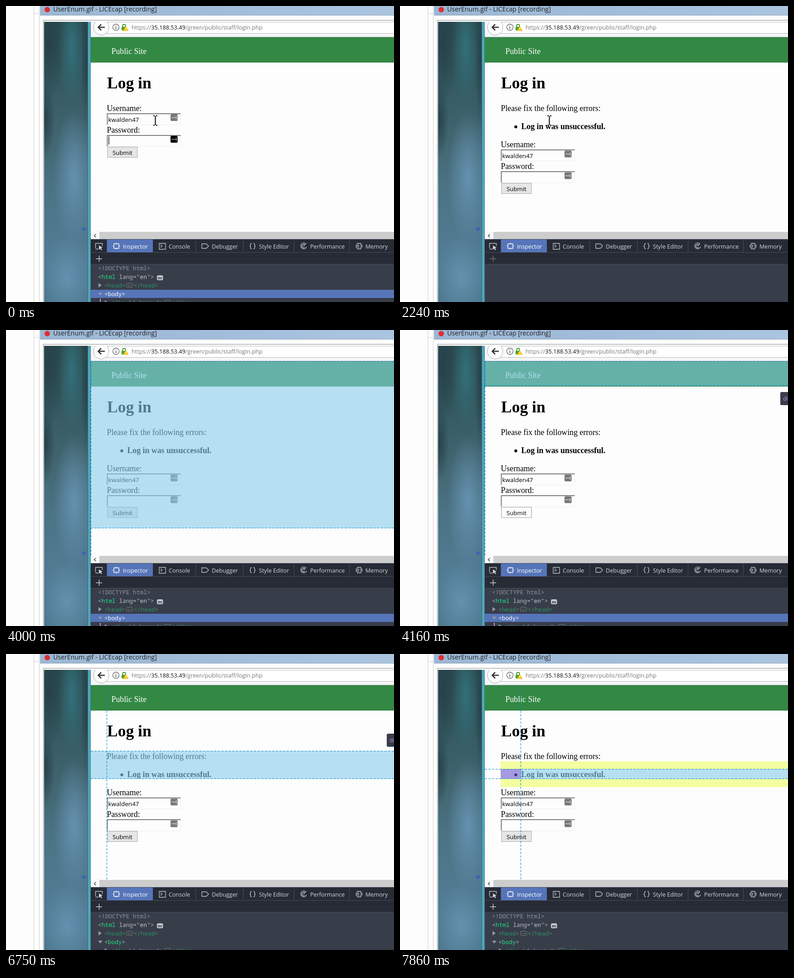
An HTML page that plays this animation: 856 by 654 pixels, repeating every 8000 ms.

```html
<!DOCTYPE html>
<html lang="en">
<head>
<meta charset="utf-8">
<title>Login check</title>
<style>
  html, body { margin: 0; width: 100%; height: 100%; overflow: hidden; background: #fdfdfd; }
  svg { display: block; width: 856px; height: 654px; }
  text { white-space: pre; }
  .ui { font-family: "Open Sans", "Noto Sans", sans-serif; }
  .web { font: 17.8px "Liberation Serif", "Times New Roman", serif; }
  .code { font: 12.85px "Noto Sans Mono", "DejaVu Sans Mono", monospace; }
  .h1 { font-size: 35.5px; }
  .b { font-weight: bold; }
</style>
</head>
<body>
<script>
const USER = "kwalden47", HOST = "35.188.53.49", LOOP = 8000;

const rect = (x, y, w, h, fill, more = "") =>
  `<rect x="${x}" y="${y}" width="${w}" height="${h}" fill="${fill}" ${more}/>`;
const line = (d, stroke, width = 1, more = "") =>
  `<path d="${d}" fill="none" stroke="${stroke}" stroke-width="${width}" ${more}/>`;
const shape = (d, fill) => `<path d="${d}" fill="${fill}"/>`;
const dot = (x, y, r, fill, more = "") => `<circle cx="${x}" cy="${y}" r="${r}" fill="${fill}" ${more}/>`;
const text = (cls, x, y, s, fill = "#000", size = 0) =>
  `<text class="${cls}" x="${x}" y="${y}" fill="${fill}"${size ? ` style="font-size:${size}px"` : ""}>${s}</text>`;
const tint = (s, fill) => `<tspan fill="${fill}">${s}</tspan>`;
// Visible only inside the given time spans: "from-to from-to"
const during = (spans, ...parts) => `<g data-on="${spans}">${parts.join("")}</g>`;

// --- desktop and recorder window ---
const blob = (x, y, rx, ry, id) => `<ellipse cx="${x}" cy="${y}" rx="${rx}" ry="${ry}" fill="url(#${id})"/>`;
const glow = (id, color) => `<radialGradient id="${id}"><stop stop-color="${color}"/>
  <stop offset="1" stop-color="${color}" stop-opacity="0"/></radialGradient>`;
const ramp = (id, axis, ...colors) => `<linearGradient id="${id}" x1="0" y1="0" ${axis}="1" ${axis == "x2" ? 'y2="0"' : 'x2="0"'}>` +
  colors.map((c, i) => `<stop offset="${i / (colors.length - 1)}" stop-color="${c}"/>`).join("") + "</linearGradient>";

const defs = `<defs>
  ${ramp("sky", "y2", "#2a4a4e", "#33585f", "#41656f", "#4b7385", "#517b92", "#4d778c")}
  ${ramp("bar", "x2", "#9bb7d4", "#a2bdda", "#abc5e1")}
  ${glow("dark", "#27414a")}${glow("teal", "#33707b")}${glow("pale", "#6591b0")}
  <clipPath id="desk"><rect x="84" y="35" width="97" height="619"/></clipPath>
  <clipPath id="view"><rect x="187" y="69" width="669" height="430"/></clipPath>
  <clipPath id="bar-clip"><rect x="187" y="35" width="669" height="34"/></clipPath></defs>`;

const desktop = line("M61.5 0V654M73.5 0V654M61 16.5H73", "#cfcfcf") +
  rect(75, 0, 781, 20, "url(#bar)") + line("M75 20.5H856", "#8fa5bd") +
  dot(91, 8, 6, "#dc2f33") +
  text("ui", 104, 12, "UserEnum.gif - LICEcap [recording]", "#222", 14.2) +
  line("M82.5 654V31.5H856", "#8a8a8a") +
  `<g clip-path="url(#desk)">` + rect(84, 35, 97, 619, "url(#sky)") +
  blob(94, 80, 36, 130, "dark") + blob(145, 90, 30, 130, "teal") + blob(86, 250, 22, 90, "dark") +
  blob(150, 380, 46, 150, "pale") + blob(178, 120, 12, 150, "dark") + blob(135, 600, 60, 90, "pale") +
  dot(172, 493, 4, "#3f63b0") + "</g>" +
  rect(180, 35, 7, 619, "#51a6bb") + line("M180.5 35V654", "#2d6a7c") + line("M186.5 35V654", "#3f7f92");

// --- browser toolbar ---
const toolbar = rect(187, 35, 669, 34, "#f5f6f7") +
  `<g clip-path="url(#bar-clip)">` + rect(215, 35.5, 650, 25, "#fff", 'stroke="#b9b9b9"') +
  dot(210, 47, 17, "#fdfdfd", 'stroke="#a9a9a9"') + "</g>" +
  line("M187 68.5H856", "#b5b5b5") +
  line("M218 47H204M210 40.5L203.500 47L210 53.500", "#333", 2.6) +
  dot(242.5, 47, 7, "#fff", 'stroke="#666" stroke-width="1.3"') +
  line("M242.500 46V51M242.500 43V44.600", "#555", 1.6) +
  line("M257.500 47V43.500a3 3 0 0 1 6 0V47", "#3f9b2f", 2) + rect(255, 46, 11, 8, "#4aa72f") +
  shape("M264.500 44.500L271 55H258Z", "#fcc21b") + line("M264.500 48V51.500M264.500 52.500V53.800", "#fff", 1.2) +
  text("ui", 277, 52, `https://${tint(HOST, "#111")}/green/public/staff/login.php`, "#777", 12.7);

// --- web pages ---
const button = (x, y, fill = "#e6e6e6") => rect(x + .5, y + .5, 66, 23, fill, 'stroke="#a5a5a5"') +
  text("ui", x + 11.5, y + 17.5, "Submit", "#000", 13.3);
const field = (x, y, plain) => plain
  ? rect(x + .5, y + .5, 162, 24, "#fff", 'stroke="#9a9a9a"')
  : line(`M${x + 162.5} ${y + 1}V${y + 24.5}H${x}`, "#eee") + line(`M${x + 163} ${y}H${x + 1}V${y + 24}`, "#7c7c7c", 2);
const form = (x, y, plain) =>
  text("web", x, y, "Username:") + field(x, y + 6, plain) +
  text("ui", x + 3, y + 24, USER, "#000", 13.5) +
  text("web", x, y + 48, "Password:") + field(x, y + 54, plain) + button(x + 1, y + 79);
const keyIcon = (y, fill = "#777") => rect(363, y, 15.5, 15, fill, 'rx="2"') +
  [366.5, 369.5, 372.5].map(x => dot(x, y + 7.5, 1, "#fff")).join("") + line(`M375.500 ${y + 4}V${y + 11}`, "#fff");
const header = rect(187, 69, 669, 56, "#338844") + text("web", 232.5, 106, "Public Site", "#fff") +
  text("web h1 b", 223, 182, "Log in");
const bullet = (x, y) => dot(x, y, 3.2, "#000");
const typed = (n, spans) => {
  const x = 227 + n * 6.5;
  return during(spans, line(`M${x} 288V306`, "#000", 1.3),
    ...Array.from({ length: n }, (_, i) => dot(229.5 + i * 6.5, 298, 2.6, "#000")));
};
const scrollbar = rect(187, 499, 669, 17, "#fafafa") + rect(206, 499, 650, 16, "#cdcdcd") +
  line("M198.500 504L194.500 507.500L198.500 511", "#444", 1.5);
const status = s => rect(186.5, 492.5, 293, 24, "#fdfdfd", 'stroke="#d0d0d0"') +
  text("ui", 192, 509, `${s} ${HOST}...`, "#555", 12.2);

const pages = rect(187, 69, 669, 447, "#fdfdfd") +
  during("0-1580", header, form(222.5, 232), scrollbar) +
  typed(0, "0-120") + typed(2, "120-240") + typed(4, "240-770") +
  during("0-1300", keyIcon(239)) + during("0-770", keyIcon(287, "#000")) + during("770-1300", keyIcon(287)) +
  during("1580-1850", bullet(229, 99), text("web", 240, 105, "Public Site", "#00e"), line("M240 107.500H318", "#00e"),
    text("web h1 b", 196.5, 167, "Log in"), text("web", 196, 216, "Please fix the following errors:"),
    bullet(229, 251), text("web", 240, 256, "Log in was unsuccessful."), form(196, 296, true)) +
  during("1850-8000", header, text("web", 222.5, 232, "Please fix the following errors:"), bullet(255.5, 267),
    text("web b", 267.5, 272, "Log in was unsuccessful."), form(222.5, 312), scrollbar) +
  during("4160-4300", button(223.5, 391, "#fdfdfd")) +
  during("2240-8000", keyIcon(319.5), keyIcon(367.5)) +
  during("770-1580", status("Waiting for")) + during("1580-2090", status("Transferring data from"));

// --- inspector panel ---
const tabs = [
  [223, 258, "Inspector", "M238 525.500H249V535.500H238ZM243.500 523V525M243.500 536V538M235.500 530.500H238M249 530.500H251.500"],
  [324, 359, "Console", "M338 524.500H352V537.500H338ZM341 527.500L344.500 530.500L341 533.500"],
  [419, 454, "Debugger", "M432 525.500H442L447 530.500L442 535.500H432Z"],
  [524, 558, "Style Editor", "M542 524.500Q539.500 524.500 539.500 527.500T537.500 530.500Q539.500 530.500 539.500 533.500T542 536.500M546 524.500Q548.500 524.500 548.500 527.500T550.500 530.500Q548.500 530.500 548.500 533.500T546 536.500"],
  [636, 671, "Performance", "M661 525A6.500 6.500 0 1 0 663 532M659 528A3.500 3.500 0 1 0 659 533M656.500 530.500L662 524.500"],
  [758, 793, "Memory", "M775 524.500H783V536.500H775ZM772.500 527V534M785.500 527V534M778 527V534"]
].map(([x, tx, name, icon], i) =>
  (i ? "" : rect(x, 516, 101, 28, "#5675b9")) + (i == 1 ? "" : line(`M${x - .5} 516V544`, "#454d5d")) +
  line(icon, i ? "#c0c4ca" : "#fff", 1.3) + text("ui", tx, 535.5, name, i ? "#d3d6da" : "#fff", 12.6)).join("");
const plus = color => line("M205.500 551.500V565M198.500 558.500H212", color, 1.4);
const tag = (name, color, close = "") => `&lt;${close}${tint(name, color)}&gt;`;
const more = (x, y) => rect(x + .5, y - 9.5, 14, 9, "none", 'rx="2.500" stroke="#69866f"') +
  [4.5, 7.5, 10.5].map(d => dot(x + d, y - 4.5, .8, "#8aa895")).join("");
const twist = (x, y, open) => shape(open ? `M${x - 5} ${y - 3}H${x + 5}L${x} ${y + 3}Z` : `M${x - 3} ${y - 5}V${y + 5}L${x + 4} ${y}Z`, "#9199a5");

const tree = during("0-520 3040-8000",
  `<g font-style="italic">${text("code", 203, 584, "&lt;!DOCTYPE html&gt;", "#8a929c")}</g>`,
  text("code", 203, 603, `&lt;${tint("html", "#1de083")} lang="${tint("en", "#c5cad0")}"&gt;`, "#b5bac2"),
  rect(333, 595, 13.5, 11, "#c5c9cf", 'rx="3"'), text("ui b", 335, 603.5, "ev", "#303642", 8.5),
  twist(207, 617), text("code", 217, 622, tag("head", "#27935f"), "#4d9070"), more(265, 622),
  text("code", 282, 622, tag("head", "#27935f", "/"), "#4d9070"),
  during("0-520 3040-4850", rect(187, 627, 669, 18, "#5675b9"), line("M208 647V654", "#c98be0", 2),
    text("code", 217, 641, "&lt;body&gt;", "#fff")),
  during("4850-8000", text("code", 217, 641, tag("body", "#1de083"), "#b5bac2")),
  twist(208, 636.5, true), twist(221, 655),
  text("code", 231, 660, `&lt;${tint("div", "#27935f")} id="menu"&gt;`, "#818995"), more(349, 660),
  text("code", 365, 660, tag("div", "#27935f", "/"), "#4d9070"));

const devtools = rect(187, 515, 669, 30, "#272b35") + line("M187 515.500H856", "#454d5d") + tabs +
  line("M197.500 535V524.500H212.500V530M197.500 537H204", "#c0c4ca", 1.4) + shape("M205 529L213 534L209.500 535L212 538.500L210 539.500L208 536L205 538.500Z", "#d3d6da") +
  rect(187, 545, 669, 25, "#272b35") + line("M187 544.500H856M187 570.500H856", "#454d5d") +
  rect(187, 571, 669, 83, "#383d4a") +
  during("0-520 2360-8000", plus("#cfd2d6")) + during("520-2360", plus("#70757e")) + tree;

// --- box model highlighter ---
const CONTENT = "#87ceeb", PADDING = "#6a5acd", MARGIN = "#edff64";
const mark = (spans, boxes, guides, tip = "") => during(spans,
  `<g clip-path="url(#view)"><g opacity=".6">${boxes.map(b => rect(...b)).join("")}</g>` +
  line(guides, "#0088cc", 1, 'stroke-dasharray="5 3"') + "</g>" + tip);
const tip = (x, y, id = "") => rect(x, y, 80, 29, "#383d4a", 'rx="3"') +
  text("ui", x + 6, y + 19, tint("div", "#c08be8") + tint(id, "#74b957"), "#fff", 12);

const marks =
  mark("4000-4160", [[187, 69, 669, 369, CONTENT]], "M187.500 69V499M187 69.500H856M187 437.500H856") +
  mark("4160-4300", [[187, 69, 669, 55, CONTENT]], "M187.500 69V499M187 69.500H856M187 122.500H856", tip(839, 137)) +
  mark("4420-6750", [[187, 148, 35, 266, PADDING], [222, 148, 634, 266, CONTENT]],
    "M222.500 69V499M187 147.500H856M187 414.500H856", tip(801, 109, "#main")) +
  mark("6750-7710", [[187, 214, 669, 62, CONTENT]],
    "M222.500 69V499M187 214.500H856M187 275.500H856", tip(840, 176)) +
  mark("7860-8000", [[222, 237, 634, 17, MARGIN], [222, 276, 634, 18, MARGIN],
    [222, 254, 45, 22, PADDING], [267, 254, 589, 22, CONTENT]], "M266.500 69V499M187 254.500H856M187 275.500H856");

// --- mouse ---
const arrow = (x, y) => `<path transform="translate(${x} ${y})" d="M0 0V16L4 12.500L6.500 18.500L9 17.500L6.500 11.500H12Z" fill="#fff" stroke="#000"/>`;
const mouse = during("0-2610", line("M325 242.500H328M331 242.500H334M325 263.500H328M331 263.500H334M329.500 243V263", "#000", 2)) +
  during("2610-2760", arrow(606, 526)) + during("2760-3040", arrow(621, 566));

document.body.innerHTML = `<svg viewBox="0 0 856 654">${defs + desktop + toolbar + pages + marks + devtools + mouse}</svg>`;

const timed = [...document.querySelectorAll("[data-on]")].map(node =>
  [node, node.dataset.on.split(" ").map(s => s.split("-").map(Number))]);

function draw() {
  const t = performance.now() % LOOP;
  for (const [node, spans] of timed)
    node.style.display = spans.some(([a, b]) => t >= a && t < b) ? "" : "none";
  requestAnimationFrame(draw);
}
draw();
</script>
</body>
</html>
```
